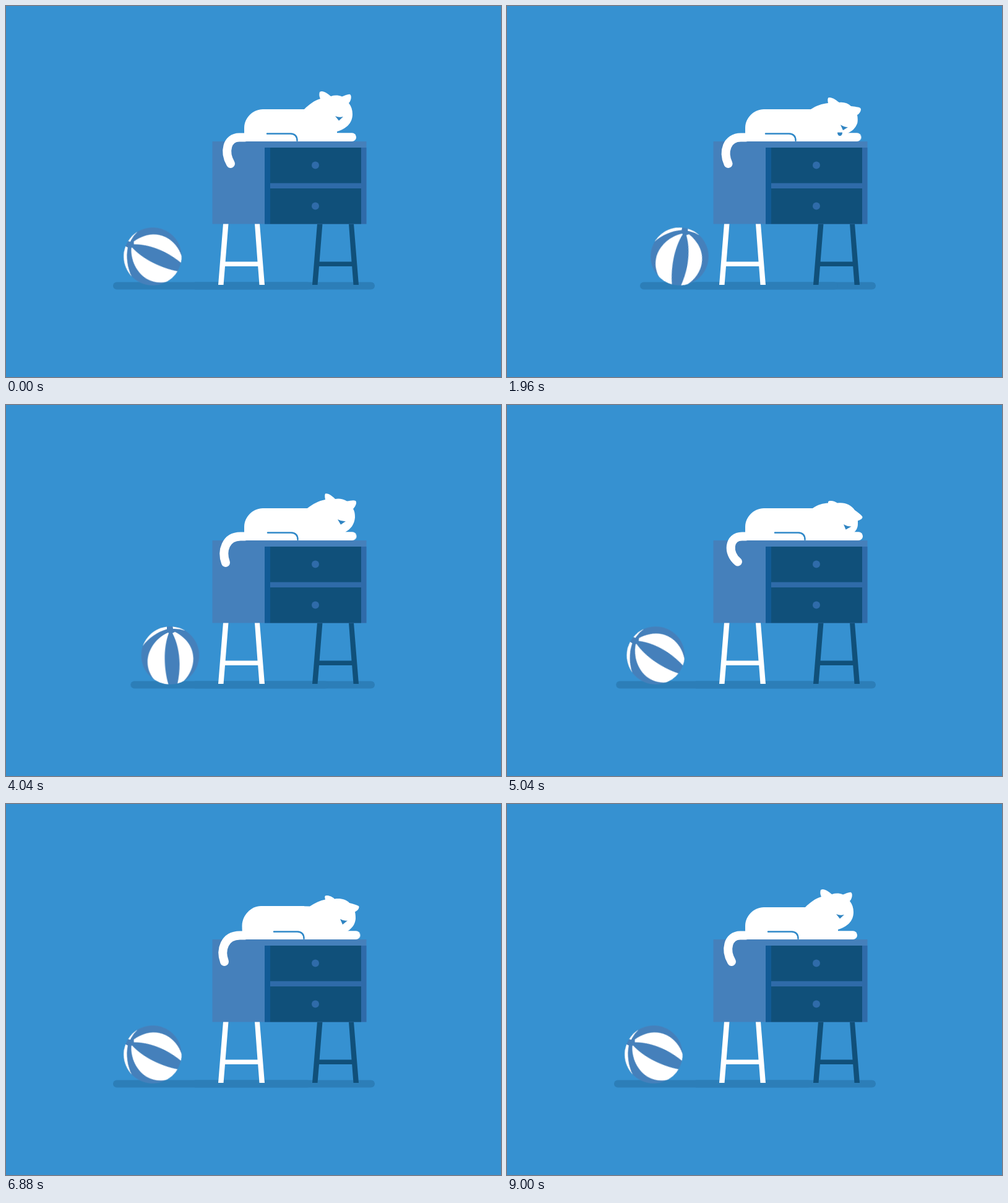
Animation, 800 px wide and 600 px high, one loop 9.04 s. Source, as an HTML page without scripts:

```html
<!DOCTYPE html>
<html lang="en">
<head>
<meta charset="utf-8">
<title>Cat on a dresser</title>
<style>
  :root {
    /* head poses, from upright to dozing */
    --head-up: path("M470,219 L470,167 L482,167 C490,159 498,153 508,150 C506,146 506,142 507,139 C512,136 519,141 525,146 C531,144 537,144 543,146.5 C548,145 553,142 556,143 C559,145 558,153 554,157 C558,162 560,168 560,175 C560,190 549,199 535,203 L535,219 Z");
    --head-mid: path("M470,219 L470,167 L487,167 C496,160 505,155 516,153 C515,149 515,145 516,143.5 C521,142 528,148 532,152 C538,150.5 545,152 551,155.5 C556,155 562,153 565,155 C568,158 564,165 561,168 C564,173 564,178 564,182 C563,193 557,201 549,205 L535,219 Z");
    --head-lick: path("M470,219 L470,167 L491,167 C500,161 509,158 519,157 C518,153 518,149 520,148 C526,147 533,153 537,156 C544,155 551,157 556,162 C562,163 568,163 571,165 C574,168 569,175 566,176 C567,181 567,187 566,190 C563,198 557,203 550,206 L535,219 Z");
    --head-low: path("M470,219 L470,167 L494,167 C502,161 511,159 519,158.5 C519,157 519,156 520,155.5 C525,154 530,156 534,158.5 C546,157 556,161 562,170 C566,173 571,176 574,180 C576,183 571,186 567,187 C567,189 567,190 567,192 C567,198 565,202 561,206 L535,219 Z");
    --head-rest: path("M470,219 L470,165 L491,165.5 C499,160 508,156 516,154.5 C515,151 515,149 516,148.5 C521,147 527,150 531,153.5 C540,152 550,154 555,160 C560,161 566,163 570,165 C572,168 568,173 564,174.5 C565,179 565,183 565,186 C564,195 559,201 553,205 L535,219 Z");
    --nose-up: path("M532,178 Q538,181 545,179 L538,185.5 Z");
    --nose-mid: path("M536,185 Q543,188.5 549,188 L541,193.5 Z");
    --nose-lick: path("M539,192 Q545,196 551,196 L543,201 Z");
    --nose-low: path("M544,193 Q550,196.5 556.5,196.5 L547.5,201.5 Z");
    --nose-rest: path("M540,186 Q546,189.5 552,188.5 L544,195 Z");
    --body-out: path("M385,219 L385,197 C385,181 399,167 415,167 L482,167 L482,219 Z");
    --body-in: path("M382,219 L381.5,197 C381.5,180 396,165 412,165 L482,165 L482,219 Z");
  }
  html, body { margin: 0; width: 100%; height: 100%; overflow: hidden; background: #3691d1; }
  svg { display: block; width: 800px; height: 600px; }
  .white { fill: #fff; }
  .dark { fill: #10507a; }
  .side { fill: #4580bb; }
  .trim { fill: #2f6ba9; }
  .shade { fill: #2c7eb8; }
  .mark { fill: #2f84c2; }
  .roll, .spin, .head, .nose, .paw, .leg, .body, .tail, .tongue {
    animation: 9.04s ease-in-out infinite;
  }
  .roll { animation-name: roll; }
  .spin { animation-name: spin; }
  .head { animation-name: head; }
  .nose { animation-name: nose; }
  .paw { animation-name: paw; }
  .leg { animation-name: leg; fill: none; stroke: #2f88c8; stroke-width: 2.5; stroke-linecap: round; }
  .body { animation-name: body; }
  .tail { animation-name: tail; fill: none; stroke: #fff; stroke-width: 14; stroke-linecap: round; }
  .tongue { animation-name: tongue; transform-origin: 538px 204.5px; }

  @keyframes roll {
    0% { transform: translateX(0); animation-timing-function: cubic-bezier(.78,0,.67,1); }
    31.86% { transform: translateX(79.5px); animation-timing-function: cubic-bezier(.33,0,.22,1); }
    63.72%, 100% { transform: translateX(0); }
  }
  @keyframes spin {
    0% { transform: rotate(-63.4deg); animation-timing-function: cubic-bezier(.8,0,.67,1); }
    31.86% { transform: rotate(82.6deg); animation-timing-function: cubic-bezier(.35,0,.3,1); }
    63.72%, 100% { transform: rotate(-63.4deg); }
  }
  @keyframes head {
    0%, 99.5%, 100% { d: var(--head-up); }
    10%, 13.3%, 21.7%, 30.1%, 38.5%, 48.7% { d: var(--head-lick); }
    15.5%, 23.9%, 32.3%, 40.5%, 55.8%, 60.8% { d: var(--head-low); }
    18.4%, 27%, 35.4%, 44.7% { d: var(--head-mid); }
    76.1%, 81.4% { d: var(--head-rest); }
  }
  @keyframes nose {
    0%, 99.5%, 100% { d: var(--nose-up); }
    10%, 13.3%, 21.7%, 30.1%, 38.5%, 48.7% { d: var(--nose-lick); }
    15.5%, 23.9%, 32.3%, 40.5%, 55.8%, 60.8% { d: var(--nose-low); }
    18.4%, 27%, 35.4%, 44.7% { d: var(--nose-mid); }
    76.1%, 81.4% { d: var(--nose-rest); }
  }
  @keyframes paw {
    0%, 99.5%, 100% { transform: translateX(0); }
    10%, 13.3%, 21.7%, 30.1%, 38.5%, 48.7%, 76.1%, 81.4% { transform: translateX(6.5px); }
    15.5%, 23.9%, 32.3%, 40.5%, 55.8%, 60.8% { transform: translateX(9px); }
    18.4%, 27%, 35.4%, 44.7% { transform: translateX(.5px); }
  }
  @keyframes leg {
    0%, 99.5%, 100% { transform: translateX(0); }
    13.3%, 30.1% { transform: translateX(-4px); }
    44.7% { transform: translateX(1px); }
    55.8%, 76.1% { transform: translateX(11px); }
  }
  @keyframes body {
    0%, 55.8%, 99.5%, 100% { d: var(--body-out); }
    76.1% { d: var(--body-in); }
  }
  @keyframes tail {
    0%, 99.5%, 100% { d: path("M386,212.5 L377,212.5 C357,212.5 352,236 363,255"); }
    13.3% { d: path("M386,212.5 L379,212.5 C354,212.5 347,236 354,255"); }
    30.1% { d: path("M386,212.5 L377,212.5 C356,212.5 350.5,236 361,255"); }
    44.7% { d: path("M386,212.5 L379,212.5 C355,212.5 348,236 355,255"); }
    55.8% { d: path("M386,212.5 L380,212.5 C358,212.5 356,240 373,253.5"); }
    76.1% { d: path("M386,212.5 L378,212.5 C353,212.5 346,236 353,255"); }
  }
  @keyframes tongue {
    0%, 11%, 15.5%, 20%, 24%, 28%, 33%, 36%, 40%, 100% { transform: scaleY(0); }
    13.3% { transform: scaleY(.45); }
    21.7%, 30.1%, 38% { transform: scaleY(1); }
  }
</style>
</head>
<body>
<svg viewBox="0 0 800 600">
  <defs>
    <clipPath id="round"><circle r="46.8"/></clipPath>
    <path id="legs" d="M351,352 H359.500 L354.600,413.500 H406.500 L402,352 H410 L418,451 H409.500 L407.200,421 H354 L351.500,451 H343 Z"/>
  </defs>

  <rect class="shade" x="300" y="446.500" width="296" height="12" rx="6"/>
  <rect class="shade roll" x="173" y="446.500" width="320" height="12" rx="6"/>

  <use href="#legs" class="white"/>
  <use href="#legs" class="dark" x="152"/>

  <rect class="side" x="333.500" y="219" width="249" height="133.500"/>
  <rect class="trim" x="418" y="229" width="164.500" height="123.500"/>
  <rect x="418" y="229" width="9" height="123.500" fill="#115a95"/>
  <rect class="dark" x="427" y="229" width="147" height="57.500"/>
  <rect class="dark" x="427" y="295" width="147" height="57.500"/>
  <circle class="trim" cx="500" cy="257.500" r="6"/>
  <circle class="trim" cx="500" cy="323.500" r="6"/>

  <path class="tail" d="M386,212.500 L377,212.500 C357,212.500 352,236 363,255"/>
  <path class="white body" d="M385,219 L385,197 C385,181 399,167 415,167 L482,167 L482,219 Z"/>
  <path class="white head"/>
  <rect class="white paw" x="466" y="205.300" width="100" height="13.700" rx="6.800"/>
  <path class="mark nose"/>
  <path class="mark tongue" d="M534,204.500 H542 C542,212 534,212 534,204.500 Z"/>
  <path class="leg" d="M422,206.500 H460 Q470.500,207 470.500,217.700"/>

  <g class="roll">
    <g transform="translate(237 405)">
      <g class="spin">
        <circle class="side" r="46.800"/>
        <g class="white" clip-path="url(#round)">
          <path d="M-3,-37 C-28,-27 -50,8 -27,38 L-20,50 L-3,48 C-10,25 -12,-10 -2,-36 Z"/>
          <path d="M4,-36 C16,-12 18,18 11,47 L18,50 L22,41 C43,20 46,-18 8,-38 Z"/>
          <path d="M-44,-16 C-35,-28 -21,-38 -5,-42.500 L-5,-50 L-50,-50 Z"/>
          <path d="M5,-43 Q15,-43.500 24,-40 L24,-50 L4,-50 Z"/>
        </g>
      </g>
    </g>
  </g>
</svg>
</body>
</html>
```
